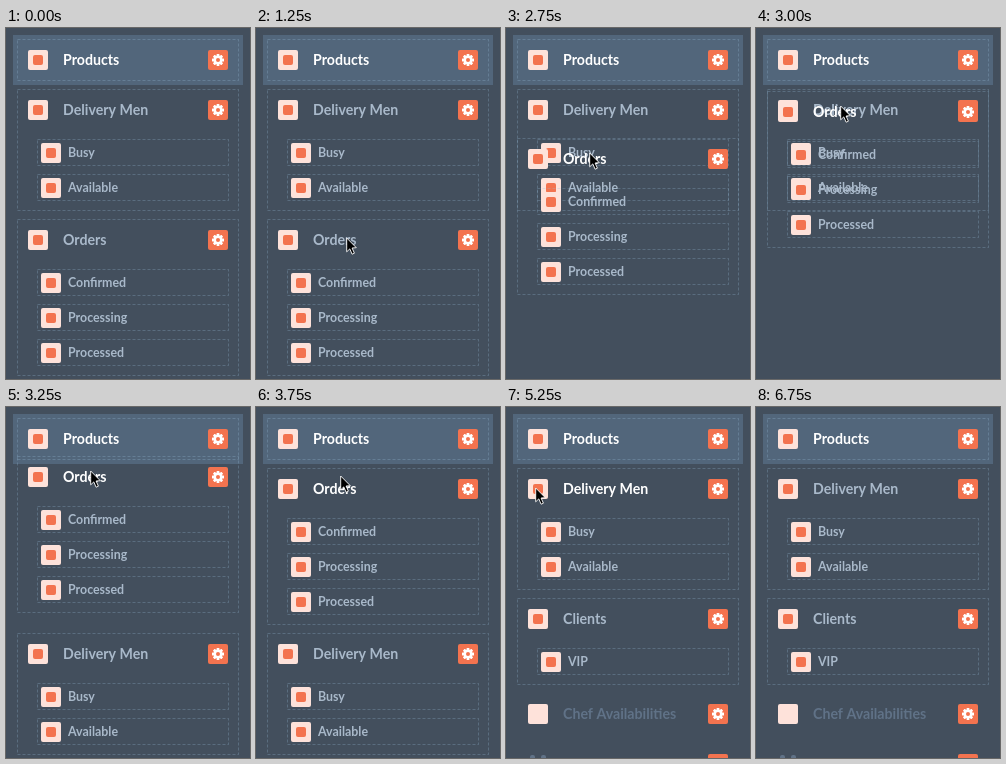
Animation of 244x351 px, one loop 7.25 s. Source, as an HTML page with a canvas:

```html
<!DOCTYPE html>
<html lang="en">
<head>
<meta charset="utf-8">
<title>Sortable list</title>
<style>
  html, body { margin: 0; width: 100%; height: 100%; overflow: hidden; background: #434f5d; }
  canvas { display: block; width: 244px; height: 351px; }
</style>
</head>
<body>
<canvas id="stage"></canvas>
<script>
const W = 244, H = 351, LOOP = 7250, STEP = 250;
const ORANGE = '#f3734f', PINK = '#fee2da', GREY = [169, 185, 202], DIM = '#607287';
const canvas = document.getElementById('stage');
const ctx = canvas.getContext('2d');
const ratio = window.devicePixelRatio || 1;
canvas.width = W * ratio;
canvas.height = H * ratio;

const DELIVERY = ['Delivery Men', 'Busy', 'Available'];
const ORDERS = ['Orders', 'Confirmed', 'Processing', 'Processed'];
const CLIENTS = ['Clients', 'VIP'];

// Pointer stops: start time, x, y
const POINTER = [
  [750, 117, 176], [1000, 97, 197], [1250, 90, 209], [2000, 88, 211],
  [2250, 79, 212], [2500, 81, 201], [2750, 83, 124], [3000, 84, 77],
  [3250, 84, 63], [3750, 84, 68], [4000, 81, 69], [4250, 51, 77],
  [4500, 31, 80], [4750, 29, 80]
];

function box(x, y, w, h, r, fill) {
  ctx.fillStyle = fill;
  ctx.beginPath();
  ctx.roundRect(x, y, w, h, r);
  ctx.fill();
}

function dashed(x, y, w, h) {
  ctx.strokeStyle = 'rgba(150,185,215,.28)';
  ctx.lineWidth = 1;
  ctx.setLineDash([3, 2]);
  ctx.strokeRect(x + .5, y + .5, w - 1, h - 1);
  ctx.setLineDash([]);
}

function text(label, x, y, size, color) {
  ctx.font = `bold ${size}px Lato, sans-serif`;
  ctx.fillStyle = color;
  ctx.fillText(label, x, y);
}

function bullet(cx, cy, filled = true) {
  box(cx - 10, cy - 10, 20, 20, 2, PINK);
  if (filled) box(cx - 5, cy - 5, 10, 10, 2, ORANGE);
}

function gear(cx, cy) {
  box(cx - 10, cy - 10, 20, 20, 2, ORANGE);
  ctx.save();
  ctx.translate(cx, cy);
  for (let i = 0; i < 4; i++) {
    box(-1.4, -6, 2.8, 12, .5, '#fff');
    ctx.rotate(Math.PI / 4);
  }
  box(-4.4, -4.4, 8.8, 8.8, 4.4, '#fff');
  box(-2, -2, 4, 4, 2, ORANGE);
  ctx.restore();
}

// Mix from grey (0) to white (1)
function titleColor(glow) {
  return `rgb(${GREY.map(c => c + (255 - c) * glow).join()})`;
}

function header(label, cy, color, filled) {
  bullet(32, cy, filled);
  text(label, 57, cy + 5, 14.2, color);
  gear(212, cy);
}

function group([title, ...items], top, glow = 0) {
  dashed(11, top, 222, 52 + 35 * items.length);
  header(title, top + 21, titleColor(glow));
  items.forEach((item, i) => {
    const y = top + 50 + 35 * i;
    dashed(31, y, 192, 27);
    bullet(45, y + 14);
    text(item, 62, y + 18, 12.4, titleColor(0));
  });
}

function pointer(x, y) {
  const shape = [[.7, 1], [.7, 14.8], [3.8, 11.9], [6.1, 17.2], [8.4, 16.2], [6.1, 11], [10.3, 10.7]];
  ctx.beginPath();
  shape.forEach(([px, py]) => ctx.lineTo(x + px, y + py));
  ctx.closePath();
  ctx.fillStyle = '#000';
  ctx.fill();
  ctx.strokeStyle = '#fff';
  ctx.lineWidth = .9;
  ctx.stroke();
}

function ordersTop(t) {
  if (t < 2750) return 191;
  if (t < 3000) return 110;
  if (t < 3250) return 63;
  return t < 3750 ? 49 : 61;
}

function draw(t) {
  ctx.setTransform(ratio, 0, 0, ratio, 0, 0);
  ctx.fillStyle = '#434f5d';
  ctx.fillRect(0, 0, W, H);

  box(7, 7, 230, 50, 0, '#52667b');
  dashed(11, 11, 222, 42);
  header('Products', 32, '#fff');

  if (t < 5000) {
    group(DELIVERY, t < 3250 ? 61 : 226);
    group(ORDERS, ordersTop(t), t < 2000 ? 0 : t < 2250 ? .5 : 1);
  } else {
    const glow = t < 5250 || t >= 6500 ? .5 : 1;
    group(DELIVERY, 61, t < 6750 ? glow : 0);
    group(CLIENTS, 191);
    header('Chef Availabilities', 307, DIM, false);
    gear(212, 357);
    box(24, 348, 5, 6, 2, DIM);
    box(35, 348, 5, 6, 2, DIM);
  }

  const stop = POINTER.findLast(([start]) => start <= t);
  if (stop && t < 6500) pointer(stop[1], stop[2]);
}

function frame() {
  const t = performance.now() % LOOP;
  draw(Math.floor(t / STEP) * STEP);
  requestAnimationFrame(frame);
}
frame();
</script>
</body>
</html>
```
